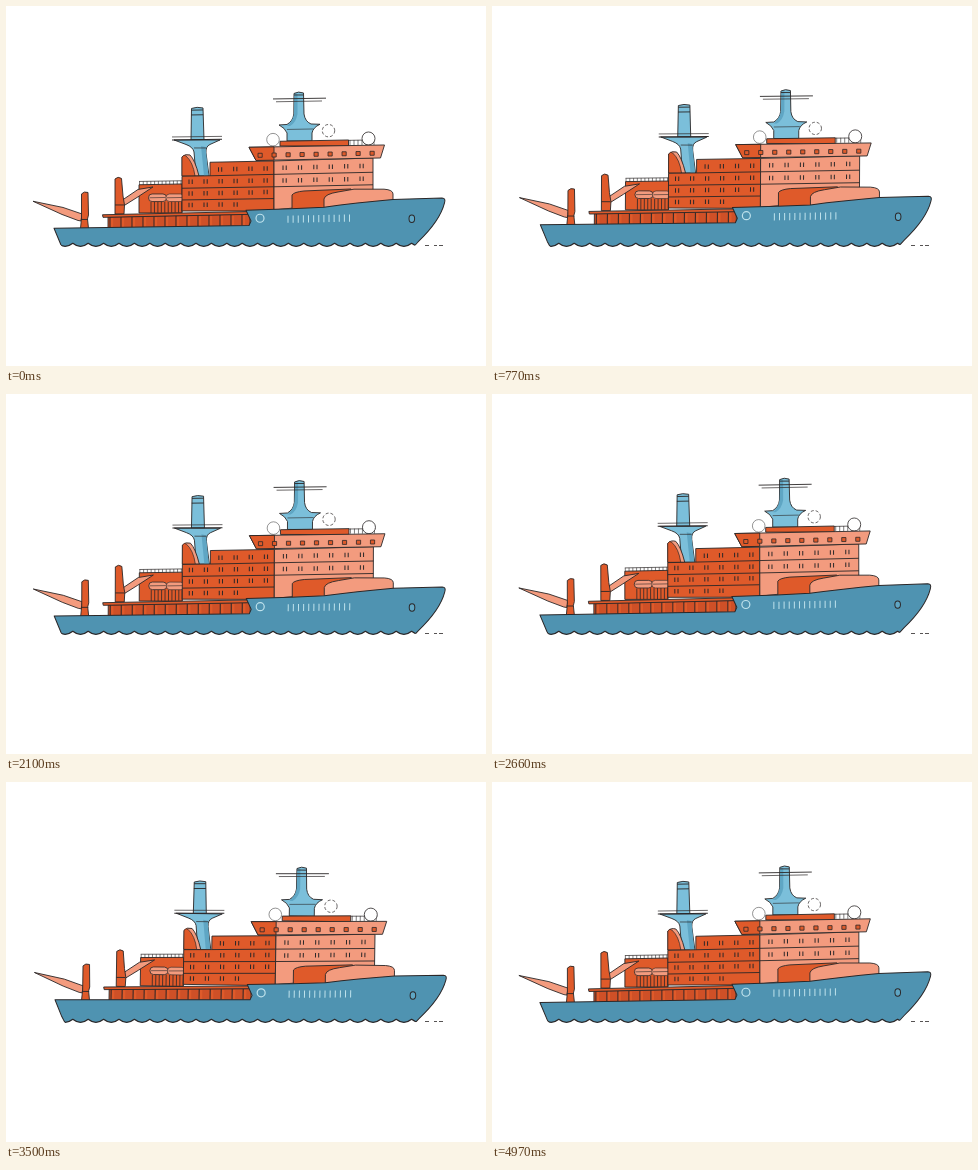
An HTML page with a canvas that plays this animation: 480x360 px, repeating every 5.04 s.

```html
<!DOCTYPE html>
<html lang="en">
<head>
<meta charset="utf-8">
<title>Ship on the waves</title>
<style>
html, body { margin: 0; width: 100%; height: 100%; overflow: hidden; background: #fff; }
canvas { display: block; width: 480px; height: 360px; }
</style>
</head>
<body>
<canvas id="stage" width="480" height="360"></canvas>
<script>
const ctx = document.getElementById('stage').getContext('2d');
const LOOP = 5040, STEP = 70, SWELL = 2240;
const INK = '#2b2728', BLUE = '#4f93b1', SKY = '#7bbfda', SHADE = '#5fa6c4';
const ORANGE = '#df5a2a', RUST = '#cf5027', SALMON = '#f39b7e', PALE = '#bfe2ec';

function shape(d, fill, width = 0.9) {
  const path = new Path2D(d);
  if (fill) { ctx.fillStyle = fill; ctx.fill(path); }
  if (width) { ctx.lineWidth = width; ctx.strokeStyle = INK; ctx.stroke(path); }
}

function line(x1, y1, x2, y2, color = INK, width = 0.9) {
  ctx.strokeStyle = color;
  ctx.lineWidth = width;
  ctx.beginPath();
  ctx.moveTo(x1, y1);
  ctx.lineTo(x2, y2);
  ctx.stroke();
}

function ring(x, y, rx, ry, color, fill, width = 0.9) {
  ctx.beginPath();
  ctx.ellipse(x, y, rx, ry, 0, 0, Math.PI * 2);
  if (fill) { ctx.fillStyle = fill; ctx.fill(); }
  ctx.strokeStyle = color;
  ctx.lineWidth = width;
  ctx.stroke();
}

// Evenly spaced uprights between two slanted edges
function posts(x1, x2, count, top1, top2, height, color = INK, width = 0.8) {
  for (let i = 0; i < count; i++) {
    const k = i / (count - 1), x = x1 + (x2 - x1) * k, y = top1 + (top2 - top1) * k;
    line(x, y, x, y + height, color, width);
  }
}

function windowPairs(x1, x2, count, y1, y2) {
  posts(x1, x2, count, y1, y2, 4.5, INK, 1);
  posts(x1 + 3.2, x2 + 3.2, count, y1, y2, 4.5, INK, 1);
}

function cranes() {
  shape('M27 195.3 L57 201.5 L76 208 L75 215 L72 214.5 L56 208.5 Z', SALMON);
  shape('M75.5 188 Q78 185 82 186.5 L82.5 209 L81.5 213 L82.5 222.5 H74.5 L75.5 212 Z', ORANGE);
  line(75, 213.5, 82, 213.5);

  shape('M147 181 L132 183.5 L116.5 194 L117.5 200 L131 191.5 Z', SALMON);
  shape('M109 173 Q112 170 115.5 172.5 L117 190 L118.5 199 L118 208 H109 Z', ORANGE);
  line(109, 199, 118, 199);
}

function afterDeck() {
  shape('M133 178.8 L176 178 V207 H133 Z', ORANGE);
  line(133, 175.5, 176, 174.8, INK, 0.7);
  posts(133.5, 175, 12, 175.5, 174.8, 3.4, INK, 0.6);
  posts(145, 176, 10, 196, 195.5, 11, INK, 0.8);
  for (const x of [142.5, 160]) {
    ctx.beginPath();
    ctx.roundRect(x, 188, 18, 7.6, 3.6);
    ctx.fillStyle = SALMON;
    ctx.fill();
    ctx.strokeStyle = INK;
    ctx.stroke();
    line(x + 1, 191.8, x + 17, 191.5, INK, 0.6);
  }
  cranes();
  shape('M102 211 L244 208 V221 L102 223 Z', RUST);
  posts(104, 236, 13, 211, 208.5, 11, INK, 1);
  posts(106, 238, 13, 212, 209.5, 9.5, ORANGE, 2.3);
  shape('M96.5 208.8 L243 205.6 V208.4 L97 211.4 Z', ORANGE);
}

function funnelMast() {
  shape('M185.5 102.5 Q191 100.5 197 102 L198 134 H185 Z', SKY);
  line(185.5, 104.2, 197, 104);
  line(185.2, 109, 197.2, 108.8);
  shape('M168 134 H214 L204 138.5 Q199.5 140.5 200 147 L203 170 H190 L188 146 Q187 141 180 138.5 Z', SKY);
  shape('M195 140 L199.5 141 L202.5 170 H198 Z', SHADE, 0);
  line(188, 142, 200, 142, INK, 0.7);
  line(166, 134, 216, 133.4, INK, 1);
  line(166, 131, 216, 130.4, INK, 0.7);
  shape('M176 170 V151 Q179 147.5 184 149 Q189 154 193 170 Z', SALMON);
  shape('M176 170 V151 Q178 148 180 150 Q187 156 189 170 Z', ORANGE, 0.7);
}

function cabins() {
  shape('M176 170.3 L204 169.8 V156.3 L268 155 V205 H176 Z', ORANGE);
  line(204, 169.8, 268, 168.4);
  line(176, 182.3, 268, 180.8);
  line(176, 194, 268, 192.6);
  windowPairs(212.5, 258, 4, 161.2, 160.2);
  for (const y of [173.5, 185.2]) windowPairs(183, 258, 6, y, y - 1.3);
  windowPairs(183, 228, 4, 196.8, 196.2);

  shape('M268 155 L367 152 V194 L268 204 Z', SALMON);
  line(268, 168.4, 367, 166.3);
  line(268, 180.8, 367, 178.8);
  windowPairs(277, 354, 6, 159.5, 157.8);
  windowPairs(277, 354, 6, 172.3, 170.6);
}

function radarMast() {
  shape('M288 87.5 Q292.5 85 297.5 87 L298 108 Q299 115.5 305 118 L314 118.3 Q307 121.5 306 127 V135 H281 V127 Q279 122 273 119 L281 118.5 Q287 115 287.8 108 Z', SKY);
  shape('M288.5 88 H291.5 V108 Q290 117 284 120 H281 Q287 115 288 108 Z', SHADE, 0);
  line(288, 89, 297.5, 89);
  line(281, 123.5, 307, 123, INK, 0.6);
  line(267, 93, 320, 92.2, INK, 0.9);
  line(270, 95.8, 316, 95, INK, 0.7);
}

function bridge() {
  radarMast();
  ctx.setLineDash([3, 2]);
  ring(322.5, 124.7, 6.2, 6.2, INK, '#fff', 0.7);
  ctx.setLineDash([]);
  line(342, 134.4, 369, 133.9, INK, 0.7);
  posts(344, 368, 7, 134, 134, 5, INK, 0.6);
  ring(267, 133.7, 6.3, 6.3, '#666', '#fff', 0.7);
  ring(362.5, 132.5, 6.5, 6.5, INK, '#fff', 0.8);
  shape('M274 135.3 L342.5 134 V140 H274 Z', ORANGE);
  shape('M243 141.3 L378.5 139 L374.5 152 L250 154.5 Z', SALMON);
  shape('M243 141.3 L268 140.9 V154.2 L250 154.5 Z', ORANGE);
  for (let i = 0; i < 9; i++) {
    const x = 252 + i * 14, y = 147.3 - i * 0.25;
    ctx.fillStyle = ORANGE;
    ctx.fillRect(x, y, 4.2, 4);
    ctx.strokeStyle = INK;
    ctx.lineWidth = 0.8;
    ctx.strokeRect(x, y, 4.2, 4);
  }
}

function foreDeck() {
  shape('M286 204 V189 Q288 186 298 185 L345 183 V200 Z', ORANGE);
  shape('M318 202 V193 Q319 188 332 186 L348 183.2 H378 Q387 183.8 387 188 V196 Z', SALMON);
}

const HULL = 'M48 222.3 L243 219.5 L245 215 L240 204.2 L285 202.8 L318 201.3 Q350 197 387 193.6 L436 192 Q440 192 438.5 197 Q434 215 412 236 L401 248 H60 L55 239 Z';

function hull() {
  shape(HULL, BLUE, 1);
  ring(254, 212.3, 4, 4, PALE, null, 1.2);
  posts(282, 343.5, 13, 209.7, 208.5, 7.2, PALE, 1);
  ring(405.8, 212.7, 2.8, 3.7, INK, SHADE, 1);
}

function wavePath() {
  const pitch = 15.4;
  const path = new Path2D();
  path.moveTo(36, 237.3);
  for (let x = 36; x < 445; x += pitch) {
    path.quadraticCurveTo(x + pitch / 2, 243.5, x + pitch, 237.3);
  }
  return path;
}

const surface = wavePath();
const water = new Path2D(surface);
water.lineTo(460, 262);
water.lineTo(20, 262);
water.closePath();

function poseShip(t) {
  const wave = (peak) => Math.cos((t - peak) / SWELL * Math.PI * 2);
  const tilt = (2.5 - 3.5 * wave(280)) / 390;
  const heave = -1.1 - 1.6 * wave(820);
  ctx.translate(245, 290 + heave);
  ctx.rotate(tilt);
  ctx.translate(-245, -290);
}

function draw(t) {
  ctx.fillStyle = '#fff';
  ctx.fillRect(0, 0, 480, 360);
  ctx.lineJoin = 'round';

  ctx.save();
  poseShip(t);
  afterDeck();
  funnelMast();
  cabins();
  bridge();
  foreDeck();
  hull();
  ctx.restore();

  ctx.fillStyle = '#fff';
  ctx.fill(water);

  ctx.save();
  poseShip(t);
  ctx.clip(new Path2D(HULL));
  ctx.resetTransform();
  ctx.strokeStyle = INK;
  ctx.lineWidth = 1.3;
  ctx.stroke(surface);
  ctx.restore();

  // Broken ripple ahead of the bow
  ctx.setLineDash([4, 5, 3, 2]);
  line(419, 239.5, 438, 239.5, INK, 0.8);
  ctx.setLineDash([]);
}

function tick(now) {
  draw(Math.floor((now % LOOP) / STEP) * STEP);
  requestAnimationFrame(tick);
}

draw(0);
requestAnimationFrame(tick);
</script>
</body>
</html>
```
